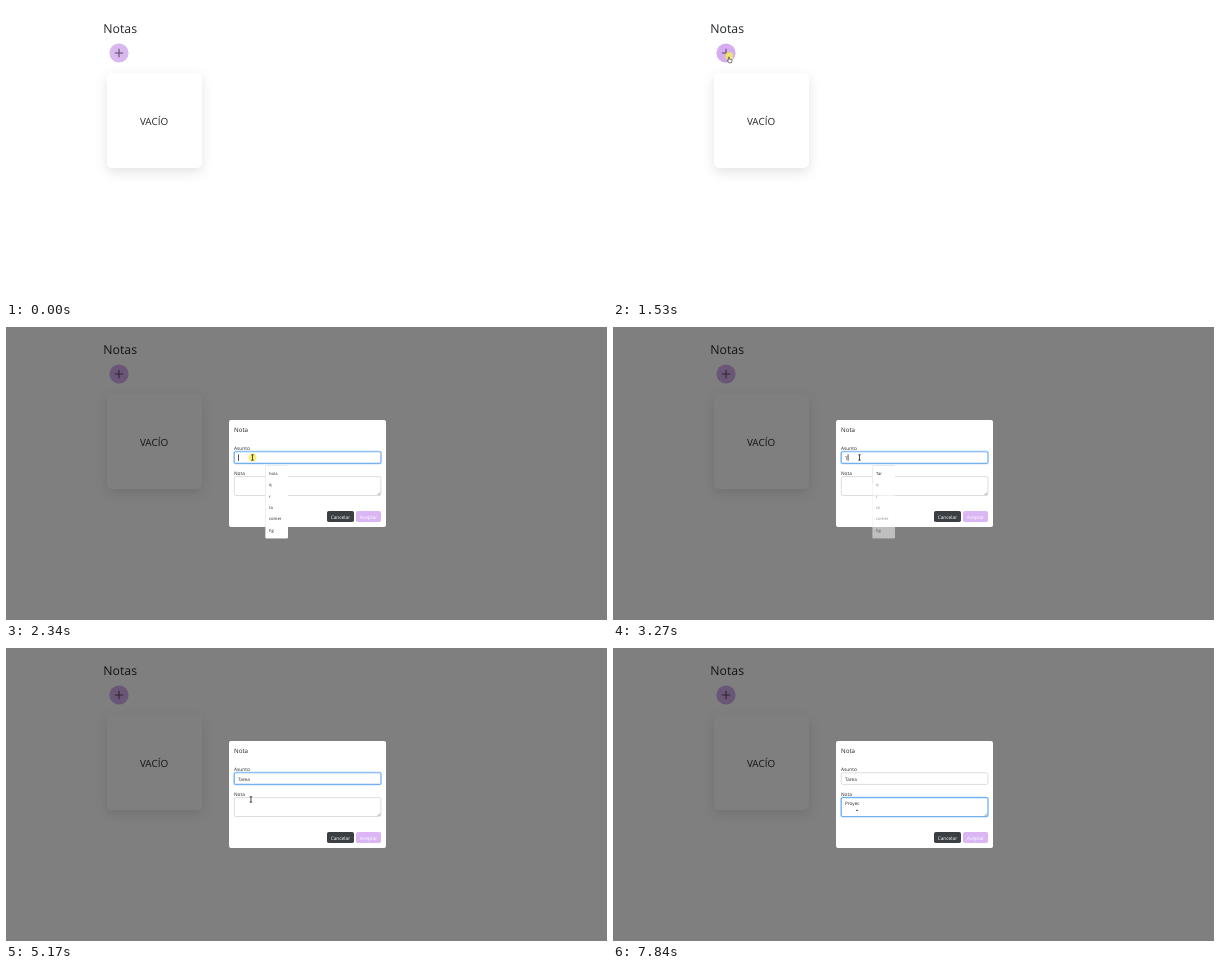
An HTML page for the animation above (8 s loop, 601x293 px).

```html
<!DOCTYPE html>
<html lang="es">
<head>
<meta charset="utf-8">
<title>Notas</title>
<style>
html, body { margin: 0; width: 100%; height: 100%; overflow: hidden; background: #fff; }
svg { display: block; width: 601px; height: 293px; }
text { font-family: "Open Sans", "Noto Sans", sans-serif; fill: #212529; text-rendering: geometricPrecision; }
.small { font-size: 4.8px; }
.field { font-size: 4.65px; }
.item { font-size: 4.2px; }
.card { filter: drop-shadow(0 4px 6px rgba(0, 0, 0, .11)); }
.box { fill: #fff; stroke: #c3c7cb; stroke-width: .6; }
.box.focus { stroke: #72b0f3; stroke-width: 1.1; }
.ring { fill: none; stroke: #72b0f3; stroke-opacity: .35; stroke-width: 1; }
.menu { fill: #fff; filter: drop-shadow(0 .5px .7px rgba(0, 0, 0, .3)); }
.caret { stroke: #111; stroke-width: .7; }
.beam { fill: none; stroke: #222; stroke-width: .8; }
.pointer { fill: #fff; stroke: #222; stroke-width: .6; stroke-linejoin: round; }
</style>
</head>
<body>
<svg viewBox="0 0 601 293">
  <text x="97.3" y="27" font-size="12.3" font-weight="500">Notas</text>
  <circle id="add" cx="113" cy="47" r="9.6" fill="#d9b7ef"/>
  <path d="M108.8 47h8.4M113 42.8v8.4" stroke="#5d4a63" stroke-width="1.1"/>
  <rect class="card" x="101" y="67" width="95" height="95" rx="5" fill="#fff"/>
  <text x="148" y="118.8" font-size="9.9" font-weight="500" text-anchor="middle">VACÍO</text>

  <g id="modal">
    <rect width="601" height="293" fill="#000" opacity=".5"/>
    <rect x="223" y="93" width="157" height="107" rx="2" fill="#fff"/>
    <text x="228" y="105" font-size="6.2" font-weight="500">Nota</text>
    <text class="small" x="228" y="123">Asunto</text>
    <rect class="ring" id="subjectRing" x="227.5" y="124" width="148" height="13" rx="2"/>
    <rect class="box" id="subjectBox" x="228.3" y="124.8" width="146.6" height="11.6" rx="1.5"/>
    <text class="field" id="subject" x="232" y="132.6"></text>
    <text class="small" x="228" y="147.5">Nota</text>
    <rect class="ring" id="noteRing" x="227.5" y="148.9" width="148" height="20.4" rx="2"/>
    <rect class="box" id="noteBox" x="228.3" y="149.6" width="146.6" height="18.9" rx="1.5"/>
    <path d="M371.5 168l2.6-2.6M373 168l1.2-1.2" stroke="#666" stroke-width=".5"/>
    <text class="field" id="note" x="232" y="157.3"></text>
    <rect x="321" y="184" width="27" height="11" rx="1.8" fill="#3b3f44"/>
    <text class="small" x="334.4" y="191.5" text-anchor="middle" style="fill:#fff">Cancelar</text>
    <rect x="350" y="184" width="25" height="11" rx="1.8" fill="#dab6f4"/>
    <text class="small" x="362.5" y="191.5" text-anchor="middle" style="fill:#fff">Aceptar</text>
    <g id="fullMenu"></g>
    <g id="shortMenu"></g>
    <path class="caret" id="caret"/>
  </g>

  <circle id="press" r="4" fill="#f6ee62" opacity=".85"/>
  <g id="cursor">
    <path class="pointer" id="arrow" d="M0 0v5.6l1.3-1.2 1 2 .9-.4-.9-1.9h1.7z"/>
    <path class="pointer" id="hand" d="M-.6 1.2q.6-.7 1.1 0v2l2 .5q.7.2.5 1l-.5 2.1h-2.7l-1.5-2.5q.3-.7 1.1 0z"/>
    <path class="beam" id="beam" d="M-1.2-2.7H1.2M0-2.7V2.7M-1.2 2.7H1.2"/>
    <path class="beam" id="foot" d="M-1.1 2.4H1.1"/>
  </g>
</svg>
<script>
const LOOP = 8000;
const $ = id => document.getElementById(id);
const show = (id, on) => { $(id).style.display = on ? "" : "none"; };
const within = (t, a, b) => t >= a && t < b;

// start, end, steps, from, to
const moves = [
  [130, 900, 12, [591, 287], [166, 73]],
  [970, 1180, 4, [153, 67], [116, 50]],
  [1790, 2070, 5, [138, 62], [246.5, 130.5]],
  [4740, 5320, 9, [247, 133], [244, 160]]
];
const subjectKeys = [[3270, "T"], [3670, "Ta"], [3870, "Tar"], [3940, "Tare"], [4470, "Tarea"]];
const noteKeys = [[6190, "P"], [7050, "Pr"], [7180, "Pro"], [7450, "Proy"], [7650, "Proye"], [7840, "Proyec"]];
const presses = [[1460, 1590], [2340, 2470], [5390, 5520]];

function fillMenu(id, items) {
  const height = 6.5 + items.length * 11.1;
  $(id).innerHTML = `<rect class="menu" x="259.3" y="138.5" width="22.7" height="${height}" rx="1"/>` +
    items.map((s, i) => `<text class="item" x="263" y="${148 + i * 11.3}">${s}</text>`).join("");
}
fillMenu("fullMenu", ["hola", "q", "r", "ta", "comer", "fig"]);
fillMenu("shortMenu", ["Tar"]);

function typed(keys, t) {
  let text = "";
  for (const [at, s] of keys) if (t >= at) text = s;
  return text;
}

function cursorAt(t) {
  let pos = moves[0][3];
  for (const [start, end, steps, from, to] of moves) {
    if (t < start) break;
    const p = Math.min(1, Math.floor((t - start) / (end - start) * (steps - 1) + .001) / (steps - 1));
    const e = p * p * (3 - 2 * p);
    pos = from.map((v, i) => v + (to[i] - v) * e);
  }
  return pos;
}

function focus(name, on) {
  $(name + "Box").classList.toggle("focus", on);
  show(name + "Ring", on);
}

function drawCaret(t) {
  const inSubject = within(t, 2340, 2870) || within(t, 3270, 4740);
  const inNote = within(t, 5390, 5920);
  show("caret", inSubject || inNote);
  if (inSubject) {
    const width = $("subject").textContent ? $("subject").getComputedTextLength() : 0;
    $("caret").setAttribute("d", `M${232.5 + width} 127.3v6.6`);
  } else if (inNote) {
    $("caret").setAttribute("d", "M232.5 152.3v6.5");
  }
}

function draw(t) {
  show("modal", t >= 1590);
  $("add").setAttribute("fill", t >= 1180 ? "#d5adf0" : "#d9b7ef");
  $("subject").textContent = typed(subjectKeys, t);
  $("note").textContent = typed(noteKeys, t);
  focus("subject", within(t, 2340, 5390));
  focus("note", t >= 5390);
  show("fullMenu", within(t, 2340, 3670));
  $("fullMenu").style.opacity = t >= 3270 ? .5 : 1;
  show("shortMenu", within(t, 3270, 4740));
  drawCaret(t);

  const [x, y] = cursorAt(t);
  $("cursor").setAttribute("transform", `translate(${x} ${y})`);
  show("cursor", t >= 130);
  const hand = within(t, 1180, 1590);
  const beam = t >= 2070;
  show("hand", hand);
  show("arrow", !hand && !beam);
  show("beam", beam && t < 7450);
  show("foot", t >= 7450);

  show("press", presses.some(([a, b]) => within(t, a, b)));
  $("press").setAttribute("cx", x);
  $("press").setAttribute("cy", y);
}

const start = performance.now();
function tick() {
  draw((performance.now() - start) % LOOP);
  requestAnimationFrame(tick);
}
tick();
</script>
</body>
</html>
```
